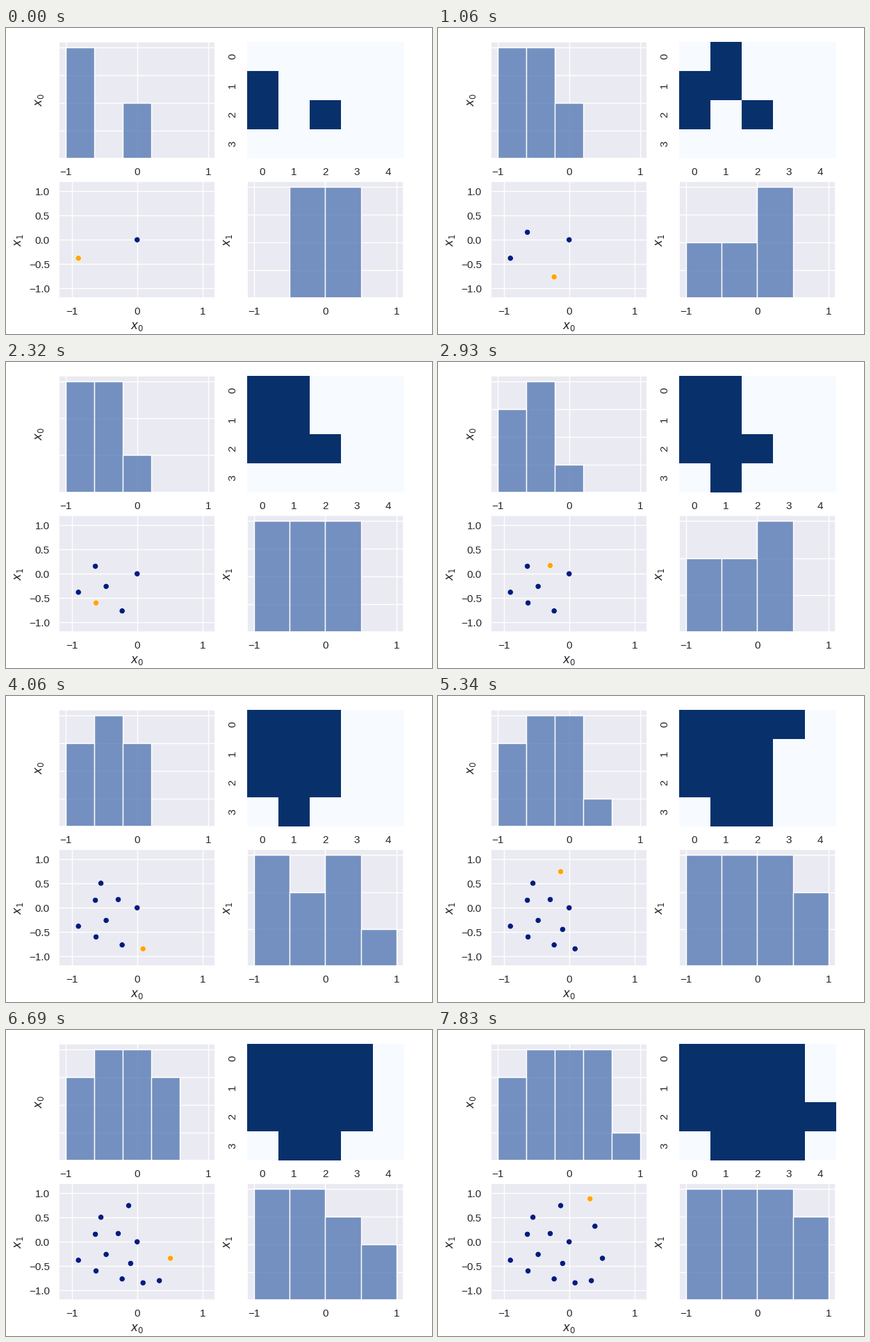
Recreate the animation shown at these times as a matplotlib script. Size 613x441 px, loop 8 s.

```python
import numpy as np
import matplotlib.pyplot as plt
from matplotlib.animation import FuncAnimation
from matplotlib.colors import ListedColormap, to_rgba

W, H, DPI = 613, 441, 100
LOOP, STEP = 8000, 40
FIRST, SECOND, BEAT = 120, 985, 615  # arrival times, then a steady beat

# Sampled points in order of arrival; the last one is only counted, never plotted.
POINTS = np.array([
    (0, 0), (-0.90, -0.38), (-0.64, 0.155), (-0.23, -0.765),
    (-0.475, -0.26), (-0.63, -0.60), (-0.29, 0.17), (-0.555, 0.505),
    (0.09, -0.845), (-0.10, -0.445), (-0.13, 0.745), (0.34, -0.80),
    (0.51, -0.34), (0.395, 0.32), (0.32, 0.885), (0.75, 0.25)])
X_EDGES = np.linspace(-1, 1, 6)
Y_EDGES = np.linspace(-1, 1, 5)

INK, BAR, DOT, NEWEST = "#262626", to_rgba("#4c72b0", 0.75), "#001c7f", "orange"

# Subplot grid in pixels, measured from the top left corner.
PANEL_W, PANEL_H = 225.45, 168
LEFT, RIGHT = 76, 346.55
TOP, BOTTOM = 19.6, 221.2

plt.rcParams.update({
    "font.family": "Liberation Sans",
    "axes.labelcolor": INK, "xtick.color": INK, "ytick.color": INK,
    "xtick.labelsize": 11, "ytick.labelsize": 11, "axes.labelsize": 12,
    "axes.facecolor": "#eaeaf2", "axes.edgecolor": "white",
    "axes.linewidth": 1.25, "axes.axisbelow": True,
    "grid.color": "white", "grid.linewidth": 1,
})

fig = plt.figure(figsize=(W / DPI, H / DPI), dpi=DPI, facecolor="white")


def panel(left, top, grid=True):
    ax = fig.add_axes([left / W, 1 - (top + PANEL_H) / H, PANEL_W / W, PANEL_H / H])
    ax.tick_params(length=0, pad=9.5)
    ax.grid(grid)
    return ax


def hist_panel(left, top, edges, name):
    ax = panel(left, top)
    ax.set(xlim=(-1.1, 1.1), xticks=[-1, 0, 1])
    ax.tick_params(labelleft=False)
    ax.set_ylabel(name, labelpad=13.5)
    bars = ax.bar(edges[:-1], 0 * edges[:-1], np.diff(edges), align="edge",
                  facecolor=BAR, edgecolor="white", linewidth=1)
    return ax, bars


def set_counts(hist, values, edges):
    ax, bars = hist
    counts = np.histogram(values, edges)[0]
    for bar, n in zip(bars, counts):
        bar.set_height(n)
    top = counts.max()
    ax.set_ylim(0, 1.05 * top)
    ax.set_yticks(np.linspace(0, top, 4 if top == 3 else 5))


hist_x = hist_panel(LEFT, TOP, X_EDGES, "$x_0$")
hist_y = hist_panel(RIGHT, BOTTOM, Y_EDGES, "$x_1$")

heat_ax = panel(RIGHT, TOP, grid=False)
heat = heat_ax.imshow(np.zeros((4, 5)), vmin=0, vmax=1, aspect="auto",
                      interpolation="nearest",
                      cmap=ListedColormap(["#f7fbff", "#08306b"]))
heat_ax.set(xticks=range(5), yticks=range(4))
heat_ax.spines[:].set_visible(False)
for label in heat_ax.get_yticklabels():
    label.set(rotation=90, va="center")

plane = panel(LEFT, BOTTOM)
plane.set(xlim=(-1.2, 1.2), ylim=(-1.2, 1.2), xticks=[-1, 0, 1],
          yticks=np.linspace(-1, 1, 5), xlabel="$x_0$", ylabel="$x_1$")
dots = plane.scatter([], [], s=36, edgecolor="white", linewidth=0.48)


def arrived(t):
    """Number of points plotted at time t."""
    return 2 + (t >= FIRST) + max(0, (t - SECOND) // BEAT + 1)


def show(frame):
    n = arrived((frame + 1) * STEP - 1)
    seen, counted = POINTS[:n], POINTS[:n + 1]

    dots.set_offsets(seen)
    dots.set_facecolor([DOT] * (n - 1) + [NEWEST])

    # The x0 bars and the coverage map run one sample ahead of the dots.
    set_counts(hist_x, counted[:, 0], X_EDGES)
    set_counts(hist_y, seen[:, 1], Y_EDGES)
    cells = np.histogram2d(counted[:, 1], counted[:, 0], [Y_EDGES, X_EDGES])[0]
    heat.set_data((cells > 0).astype(float))
    return dots, heat


anim = FuncAnimation(fig, show, frames=LOOP // STEP, interval=STEP,
                     repeat=True, repeat_delay=0, blit=False)
plt.show()
```
